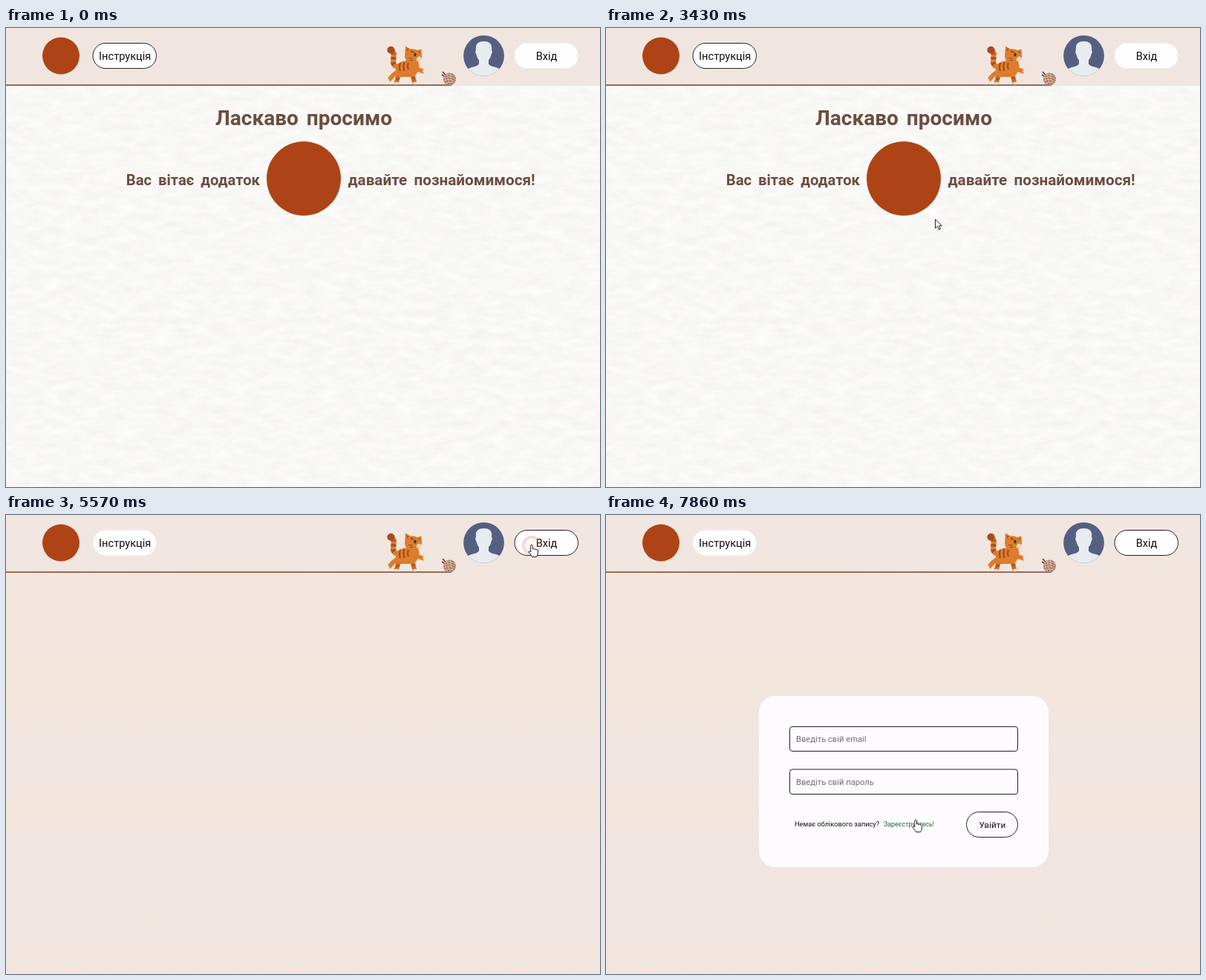
An HTML page for the animation above (8000 ms loop, 800x619 px).

```html
<!DOCTYPE html>
<html lang="uk">
<head>
<meta charset="utf-8">
<title>Ласкаво просимо</title>
<style>
  html, body { margin: 0; width: 100%; height: 100%; overflow: hidden; background: #f1e6df; }
  svg { display: block; width: 800px; height: 619px; }
  text { font-family: Roboto, "Open Sans", sans-serif; fill: #111; }
  .hello { font-weight: 700; fill: #6b4e40; word-spacing: 4px; }
  .btn { font-size: 14.6px; text-anchor: middle; }
  .hint { font-size: 11.2px; fill: #707070; }
  .pill { fill: #fefdff; }
  .box { fill: #fdfbfe; stroke: #222; }
  .logo { fill: #ae4416; }
</style>
</head>
<body>
<svg viewBox="0 0 800 619">
  <defs>
    <filter id="plaster" x="0" y="0" width="1" height="1" color-interpolation-filters="sRGB">
      <feTurbulence type="fractalNoise" baseFrequency=".04 .1" numOctaves="3" seed="7"/>
      <feColorMatrix values=".06 0 0 0 .944  .06 0 0 0 .942  .06 0 0 0 .937  0 0 0 0 1"/>
    </filter>
    <linearGradient id="sand" x2="0" y2="1">
      <stop offset="0" stop-color="#f1e6e0"/>
      <stop offset=".4" stop-color="#f2e6dd"/>
      <stop offset=".54" stop-color="#f0e5e1"/>
      <stop offset=".65" stop-color="#f2e6dd"/>
      <stop offset=".73" stop-color="#f0e5e1"/>
      <stop offset="1" stop-color="#f2e6df"/>
    </linearGradient>
    <clipPath id="face"><circle cx="643.5" cy="37.4" r="27.4"/></clipPath>
    <clipPath id="ball"><circle cx="597.5" cy="69" r="8.5"/></clipPath>
  </defs>

  <g id="home">
    <rect y="78" width="800" height="541" filter="url(#plaster)"/>
    <rect width="800" height="78" fill="#f1e6df"/>
    <text class="hello" x="401" y="131" font-size="28" text-anchor="middle">Ласкаво просимо</text>
    <text class="hello" x="342" y="211.5" font-size="20.2" text-anchor="end">Вас вітає додаток</text>
    <circle class="logo" cx="401" cy="203" r="50"/>
    <text class="hello" x="460.5" y="211.5" font-size="20.7">давайте познайомимося!</text>
  </g>

  <g id="login">
    <rect width="800" height="619" fill="url(#sand)"/>
    <g id="card">
      <rect x="206" y="244" width="390" height="231" rx="22" fill="#fdfbfe"/>
      <rect class="box" x="247.5" y="285.5" width="307" height="33" rx="3.5"/>
      <rect class="box" x="247.5" y="343" width="307" height="33.5" rx="3.5"/>
      <text class="hint" x="256" y="306">Введіть свій email</text>
      <text class="hint" x="256" y="364">Введіть свій пароль</text>
      <text x="254" y="420" font-size="9.2">Немає облікового запису?</text>
      <text x="374" y="420" font-size="8.9" style="fill:#1f6b24">Зареєструйтесь!</text>
      <rect class="box" x="485.5" y="400.5" width="69" height="34" rx="17"/>
      <text x="520.3" y="421.5" font-size="11.7" text-anchor="middle">Увійти</text>
    </g>
  </g>

  <g id="header">
    <circle class="logo" cx="74" cy="37.5" r="25"/>
    <rect id="guide" class="pill" x="117" y="20.5" width="85.5" height="34" rx="17"/>
    <text class="btn" x="160.2" y="43">Інструкція</text>
    <rect id="enter" class="pill" x="685" y="20.5" width="85.5" height="34" rx="17"/>
    <text class="btn" x="728" y="43">Вхід</text>
    <path d="M0 77H600" stroke="#9a6a54" stroke-width="2"/>

    <g id="yarn">
      <path d="M588 59l8 9M587 63l8 5" stroke="#6b3526" stroke-width="1.6"/>
      <circle cx="597.5" cy="69" r="8.5" fill="#a57663"/>
      <path clip-path="url(#ball)" fill="none" stroke="#ecd8cb" stroke-width=".7"
        d="M588 66q9-7 18 1M588 69q9-7 18 1M589 72q8-6 17 1M591 61q-1 9 5 17M595 60q-2 9 5 18M599 60q-2 9 5 17M592 75q6-4 12 0"/>
    </g>

    <g id="cat" fill="none">
      <g stroke-linecap="round" stroke="#c96a22" stroke-width="6">
        <path d="M529 62L526 73M547 62L550 73"/>
        <path stroke="#dd7d2d" d="M528 59Q522 62 516 70M552 55L562 58.5"/>
        <path stroke="#dd7d2d" stroke-width="7" d="M531 52C520 53 521 46 522 40C523 33 521 30 517 29.5"/>
      </g>
      <path stroke="#a94a1b" stroke-width="7" stroke-dasharray="3 4" d="M523 49C520.5 46 521.5 43 522 40C522.5 37 522.5 36 522 34"/>
      <circle cx="518.5" cy="29.8" r="5" fill="#a94a1b"/>
      <path fill="#dd7d2d" d="M525 55Q526 47 534 45L552 42Q558 47 556 55Q554 65 545 66H530Q524 65 525 55Z"/>
      <path fill="#dd7d2d" d="M537 39L538 24.5L545 28.5Q550 27.5 554 30L559.5 28.5L560 38Q560 46 550 47.5Q538 47 537 39Z"/>
      <path fill="#f4d9bd" d="M555 39q5-2 5 1-1 5-6 5-3-3 1-6z"/>
      <path fill="#b95420" d="M539.5 27v5l3.5-3zM558 30.5l-2.5 1.5 2 2.5z"/>
      <path stroke="#a94a1b" stroke-width="2.2" d="M531 47q-2 6 0 11M536.5 46q-2 6 0 12M542 47q-2 5 0 9M526 68l4 1M547 68l4-1M545 31l4 2"/>
      <ellipse cx="551" cy="36" rx="1.7" ry="2.4" fill="#30432c"/>
      <path stroke="#773516" stroke-width=".8" d="M558 39h2M547 41l-5-.5M548 43l-4 1"/>
      <path stroke="#f6e3d1" stroke-width="3.5" stroke-linecap="round" d="M563 57.5l1 2.5M514 69.5l1.5 3M525 74.5h2M550 74.5h2"/>
    </g>

    <g clip-path="url(#face)">
      <rect x="616" y="10" width="55" height="55" fill="#555f82"/>
      <path fill="#e6ecf0" d="M633 30Q631 18 643.5 18Q656 18 654 30Q656 31 653.5 36Q652.5 41 650 43.5V48.5Q652 51.5 660 53Q668 55 671 66H616Q619 55 627 53Q635 51.5 637 48.5V43.5Q634.500 41 633.500 36Q631 31 633 30Z"/>
    </g>
  </g>

  <circle id="ripple" cx="708" cy="41" fill="#f6c3b2" fill-opacity=".4" stroke="#e88468" stroke-width="3.5"/>

  <g id="pointer" stroke-linejoin="round">
    <path id="arrow" fill="#fff" stroke="#222" d="M0 0V12L3 9.3L5 14L7 13.1L5 8.7H8.8Z"/>
    <path id="hand" fill="#fff" stroke="#222"
      d="M-1.3 1.2Q0-.8 1.3 1.2V6Q2.5 4.8 3.8 6.3Q5 5.2 6.2 6.8Q8.4 6 8.3 8.5V12Q8 14.5 6.5 16.5H.6Q-1 13.5-3.6 10.8Q-4.4 8.6-2.7 8.6L-1.3 10Z"/>
    <path id="beam" fill="none" stroke="#333" d="M-3-7.5Q0-7.5 0-6Q0-7.5 3-7.5M0-6V6M-3 7.5Q0 7.5 0 6Q0 7.5 3 7.5"/>
  </g>
</svg>
<script>
const LOOP = 8000, FPS = 7;
const PAGE_STEP = 39, CLICK_STEP = 36;

// step, x, y of the pointer tip; repeated points are rests
const PATH = [
  [10, -5, 269.5], [12, 80, 292], [14, 168, 304], [16, 168, 304],
  [17, 212, 308], [19, 308, 303], [21, 407, 285], [23, 407, 285],
  [24, 443.5, 258], [28, 592, 156], [30, 592, 156],
  [31, 625, 130], [33, 680, 79], [35, 706, 46], [36, 708, 40], [41, 708, 40],
  [42, 702, 61], [44, 622, 151], [46, 533, 235], [48, 484, 305],
  [50, 449, 365], [52, 427, 398], [54, 420, 409], [55, 417, 411]
];

const $ = id => document.getElementById(id);
const show = (id, on) => { $(id).style.display = on ? "" : "none"; };
const clamp = v => Math.max(0, Math.min(1, v));
const inside = (x, y, l, t, r, b) => x >= l && x <= r && y >= t && y <= b;

function pointAt(step) {
  const i = PATH.findIndex(p => p[0] >= step);
  const b = PATH[i], a = PATH[Math.max(0, i - 1)];
  const f = b === a ? 0 : (step - a[0]) / (b[0] - a[0]);
  return [a[1] + (b[1] - a[1]) * f, a[2] + (b[2] - a[2]) * f];
}

function drawPointer(step, login) {
  show("pointer", step >= PATH[0][0]);
  const [x, y] = pointAt(step);
  const onEnter = inside(x, y, 685, 20, 771, 55);
  const onLink = login && inside(x, y, 374, 407, 442, 425);
  const onField = login && (inside(x, y, 247, 285, 555, 319) || inside(x, y, 247, 343, 555, 377));
  const kind = onEnter || onLink ? "hand" : onField ? "beam" : "arrow";
  for (const id of ["arrow", "hand", "beam"]) show(id, id === kind);
  $("pointer").setAttribute("transform", `translate(${x} ${y})`);
  return onEnter;
}

function draw(step) {
  const login = step >= PAGE_STEP;
  show("home", !login);
  show("login", login);
  const fade = clamp((step - PAGE_STEP) / 5);
  $("card").style.opacity = fade * fade * (3 - 2 * fade);

  const onEnter = drawPointer(step, login);
  $("guide").style.stroke = login ? "none" : "#222";
  $("enter").style.stroke = login || onEnter ? "#222" : "none";

  const age = step - CLICK_STEP;
  show("ripple", age >= 0 && age < 5);
  $("ripple").setAttribute("r", 5 + Math.max(0, age) * 2.1);
  $("ripple").style.opacity = [.9, .8, .65, .3, .1][age] || 0;
}

let last = -1;
function tick() {
  const step = Math.floor(performance.now() % LOOP * FPS / 1000 + .05) % (LOOP * FPS / 1000);
  if (step !== last) draw(last = step);
  requestAnimationFrame(tick);
}
tick();
</script>
</body>
</html>
```
